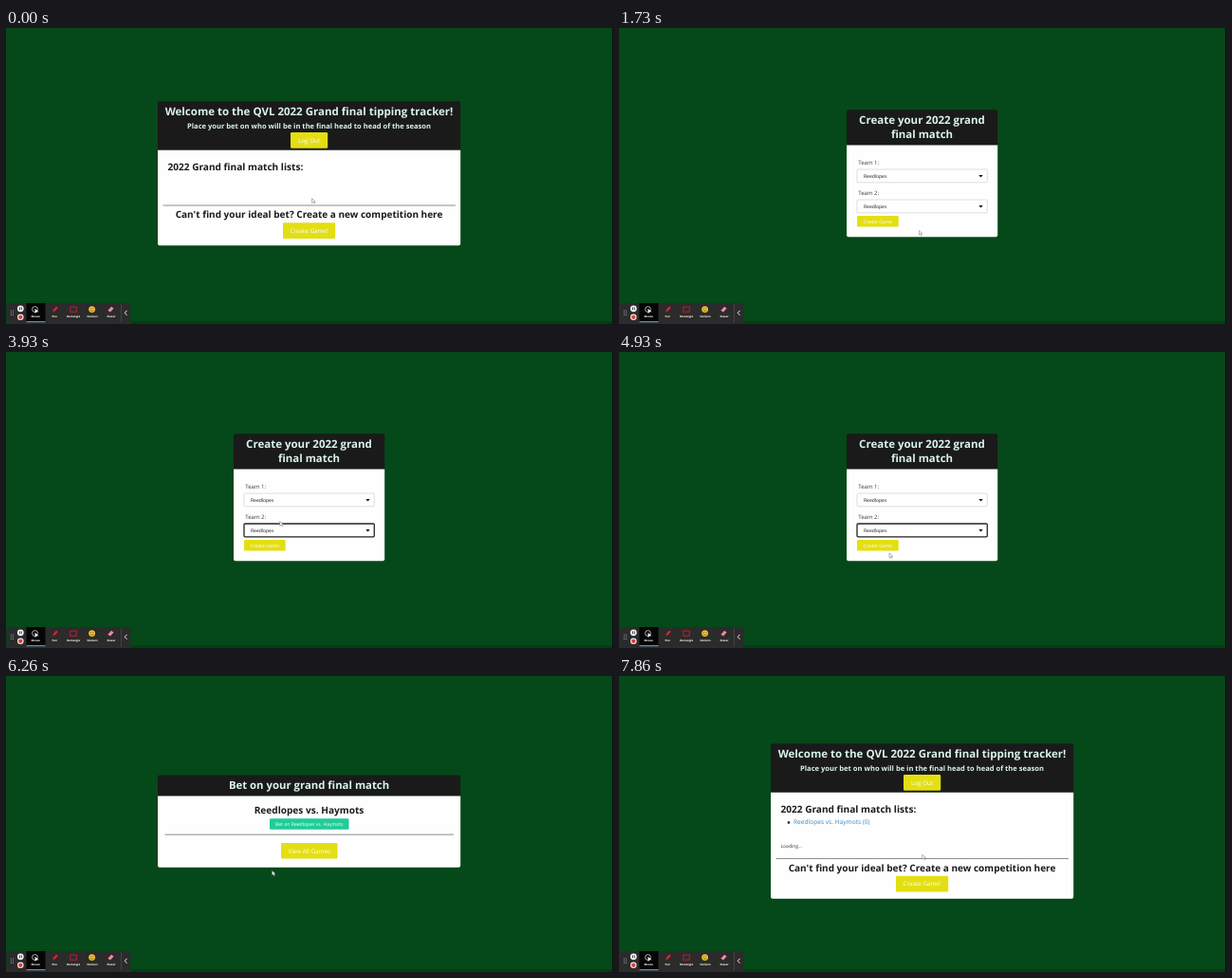
Animation, 640 px wide and 312 px high, one loop 8000 ms. Source, as an HTML page:

```html
<!DOCTYPE html>
<html lang="en">
<head>
<meta charset="utf-8">
<title>Tipping tracker</title>
<style>
html, body { margin: 0; width: 100%; height: 100%; overflow: hidden; background: #054819; }
svg { display: block; width: 100%; height: 100%; }
text { font-family: "Open Sans", "Noto Sans", sans-serif; fill: #1b1b1b; white-space: pre; }
.mid { text-anchor: middle; }
.bold { font-weight: 700; }
.pale { fill: #daf3ee; }
.white { fill: #fff; }
.soft { fill: #3a3a3a; }
.link { fill: #3f86bd; }
</style>
</head>
<body>
<svg id="stage" viewBox="0 0 640 312" text-rendering="geometricPrecision"></svg>
<script>
const LOOP = 8000;
const TEAM_A = 'Reedlopes', TEAM_B = 'Haymots';
const MATCH = `${TEAM_A} vs. ${TEAM_B}`;
const CENTER = 319.5;
const YELLOW = '#e3df12', LIGHT = '#e0f385', TEAL = '#20cc97';

const rect = (x, y, w, h, fill, more = '') =>
  `<rect x="${x}" y="${y}" width="${w}" height="${h}" fill="${fill}" ${more}/>`;
const text = (x, y, size, cls, str) =>
  `<text x="${x}" y="${y}" font-size="${size}" class="${cls}">${str}</text>`;
const shift = (dy, body) => `<g transform="translate(0 ${dy})">${body}</g>`;
// Shown only while from <= time < to
const during = (from, to, body) => `<g data-from="${from}" data-to="${to}">${body}</g>`;
const rule = (x, y, w) => rect(x, y, w, 0.8, '#707070');

function card(x, y, w, h, head) {
  const inner = w - 4;
  return `<path d="M${x} ${y + head}V${y + 2}q0 -2 2 -2h${inner}q2 0 2 2V${y + head}z" fill="#1a1a1a"/>` +
    `<path d="M${x} ${y + head}V${y + h - 2}q0 2 2 2h${inner}q2 0 2 -2V${y + head}z" fill="#fefefe"/>`;
}

function button(x, y, w, h, size, label, fill, hot) {
  const lit = hot ? during(...hot, rect(x, y, w, h, LIGHT, 'rx="1.3"')) : '';
  return rect(x, y, w, h, fill, 'rx="1.3"') + lit +
    text(x + w / 2, y + h / 2 + size * 0.36, size, 'mid white', label);
}

function home(dy, gap, list, hot) {
  return shift(dy,
    card(160, 77.2, 319.2, 152 + gap, 51.5) +
    text(CENTER, 91.7, 11.5, 'mid bold pale', 'Welcome to the QVL 2022 Grand final tipping tracker!') +
    text(CENTER, 105.5, 7.57, 'mid bold pale', 'Place your bet on who will be in the final head to head of the season') +
    button(300, 110, 39.2, 16.8, 6.35, 'Log Out', YELLOW) +
    text(170.5, 150.3, 10.1, 'bold', '2022 Grand final match lists:') +
    list +
    shift(gap,
      rule(165.5, 186.6, 308.5) +
      text(CENTER, 200.1, 10.02, 'mid bold', "Can't find your ideal bet? Create a new competition here") +
      button(292, 205.2, 55.2, 16.8, 6.3, 'Create Game!', YELLOW, hot)));
}

const loading = (x, y) => text(x, y, 5, 'soft', 'Loading...');

function select(y, value, focusFrom, focusTo) {
  const box = stroke => rect(251, y, 137.3, 13.8, 'none', `rx="1" ${stroke}`);
  return box('stroke="#d6d6d6" stroke-width="0.8"') +
    during(focusFrom, focusTo, box('stroke="#2a2a2a" stroke-width="1.3"')) +
    `<path d="M379.3 ${y + 6}h4.4l-2.2 2.5z" fill="#111"/>` + value;
}

function form() {
  const value = (y, str) => text(258, y, 5, '', str);
  return card(240, 86.3, 159.2, 134, 37.2) +
    text(CENTER, 101, 11.5, 'mid bold pale', 'Create your 2022 grand') +
    text(CENTER, 116, 11.4, 'mid bold pale', 'final match') +
    text(252.3, 143.7, 6, 'soft', 'Team 1:') +
    select(149, value(157.9, TEAM_A), 2660, 3530) +
    text(252.3, 175.7, 6, 'soft', 'Team 2:') +
    select(181, during(0, 5260, value(189.8, TEAM_A)) + during(5260, LOOP, value(189.8, TEAM_B)), 3660, 5360) +
    button(251, 198, 43.7, 11.6, 5.05, 'Create Game', YELLOW, [5260, 5860]);
}

const betTitle = y => text(CENTER, y, 11.35, 'mid bold pale', 'Bet on your grand final match');

const betLoading = card(160, 139.3, 319.2, 27.8, 21.7) + betTitle(153.8) + loading(160.5, 166);

const betReady = card(160, 104.6, 319.2, 97.1, 21.9) + betTitle(119) +
  text(CENTER, 144.8, 10.1, 'mid bold', MATCH) +
  button(278, 150.2, 83.5, 11.5, 5.08, `Bet on ${MATCH}`, TEAL) +
  rule(167.5, 166.7, 304.5) +
  button(290, 176, 59.5, 16.5, 6.3, 'View All Games', YELLOW, [6960, 7400]);

function toolbar() {
  const label = (x, str) => text(x, 305.1, 2.9, 'mid bold white', str);
  const dots = [0, 1, 2].map(i =>
    rect(4.9, 297.6 + i * 2.2, 1, 1, '#aaa') + rect(7.1, 297.6 + i * 2.2, 1, 1, '#aaa')).join('');
  return rect(0.8, 290, 130.4, 21.3, '#2b2b2b', 'rx="2"') + dots +
    '<circle cx="15.3" cy="295.8" r="3.4" fill="#f4f4f4"/>' +
    rect(13.9, 294.3, 0.9, 3, '#333') + rect(15.8, 294.3, 0.9, 3, '#333') +
    '<circle cx="15.3" cy="304.8" r="3.3" fill="#f2e4e2"/><circle cx="15.3" cy="304.8" r="2.1" fill="#dc3a35"/>' +
    rect(21.5, 290, 20, 19.5, '#050505') + rect(21.5, 309.2, 20, 1, '#6fb0cc') +
    '<circle cx="30.5" cy="296.5" r="2.9" fill="none" stroke="#ddd" stroke-width="0.8"/>' +
    '<path d="M30.5 295.7l4 3.6h-2.2l-1.6 1.6z" fill="#fff"/>' +
    '<path d="M49.4 299l.5-2 3.2-3.4 1.6 1.5-3.3 3.3z" fill="#e02438"/>' +
    rect(67.8, 294, 6.4, 5.2, 'none', 'stroke="#c91f33" stroke-width="0.9"') +
    '<circle cx="90.6" cy="296.6" r="3.4" fill="#f4c430"/>' +
    '<path d="M88.8 297.4q1.8 2 3.6 0" stroke="#6b4312" stroke-width="0.7" fill="none"/>' +
    '<circle cx="89.4" cy="295.6" r="0.5" fill="#6b4312"/><circle cx="91.8" cy="295.6" r="0.5" fill="#6b4312"/>' +
    '<path d="M107.4 297.8l3.6-4 2.6 1.8-3.6 4z" fill="#e98e98"/>' +
    label(31.3, 'Mouse') + label(51.2, 'Pen') + label(71, 'Rectangle') + label(91, 'Stickers') + label(111, 'Eraser') +
    rect(121.3, 291, 0.6, 19.5, '#555') +
    '<path d="M127.5 297.8l-2.3 2.5 2.3 2.5" fill="none" stroke="#eee" stroke-width="1"/>';
}

const ring = '<circle r="10.7" cx="-0.3" cy="0.5" fill="#fff" fill-opacity="0.2" stroke="#e2604a" stroke-width="1.25"/>';

const stage = document.getElementById('stage');
stage.innerHTML =
  rect(0, 0, 640, 312, '#054819') +
  rect(131, 309, 509, 3, '#043d14') + rect(639, 0, 1, 312, '#04180b') +
  during(0, 1460, home(0, 0, '', [800, 1460])) +
  during(1460, 5860, form()) +
  during(5860, 6260, betLoading) +
  during(6260, 7400, betReady) +
  during(7400, 7860, home(-2.2, 4.5, loading(170.5, 179))) +
  during(7860, LOOP, home(-6, 11.6,
    rect(177.8, 159.3, 2.3, 2.3, '#1b1b1b') + text(184, 162.4, 6.6, 'link', `${MATCH} (0)`) + loading(170.5, 186.5))) +
  toolbar() +
  '<g id="cursor">' +
  during(1130, 1400, ring) + during(5360, 5600, ring) + during(7200, 7400, ring) +
  '<path d="M0 0v4.7l1.2-1 .9 1.7 .9-.5-.8-1.6h1.5z" fill="#fff" stroke="#6a6a6a" stroke-width="0.5"/></g>';

const cursor = document.getElementById('cursor');
const timed = [...stage.querySelectorAll('[data-from]')];

// time, x, y
const path = [
  [0, 322.6, 179.7], [200, 322.6, 179.7], [800, 316.5, 213.5], [1860, 316.3, 213.6],
  [2460, 300, 156], [3330, 300, 157], [3660, 290, 184], [3930, 288.7, 178.5],
  [4130, 288.7, 180], [4460, 288, 188], [4930, 285, 212], [5260, 282, 208],
  [5460, 280.5, 205.3], [6260, 280.5, 205.3], [6860, 300, 195], [7060, 317, 188.5],
  [7200, 319.3, 188], [LOOP, 319.8, 188.3]
];

function cursorAt(t) {
  const i = path.findIndex(p => p[0] > t);
  const [t0, x0, y0] = path[i - 1], [t1, x1, y1] = path[i];
  const k = (t - t0) / (t1 - t0), e = k * k * (3 - 2 * k);
  return [x0 + (x1 - x0) * e, y0 + (y1 - y0) * e];
}

const start = performance.now();
function draw(now) {
  const t = Math.max(0, now - start) % LOOP;
  for (const el of timed) {
    el.style.display = t >= +el.dataset.from && t < +el.dataset.to ? '' : 'none';
  }
  cursor.setAttribute('transform', `translate(${cursorAt(t).join(' ')})`);
  requestAnimationFrame(draw);
}
draw(start);
</script>
</body>
</html>
```
